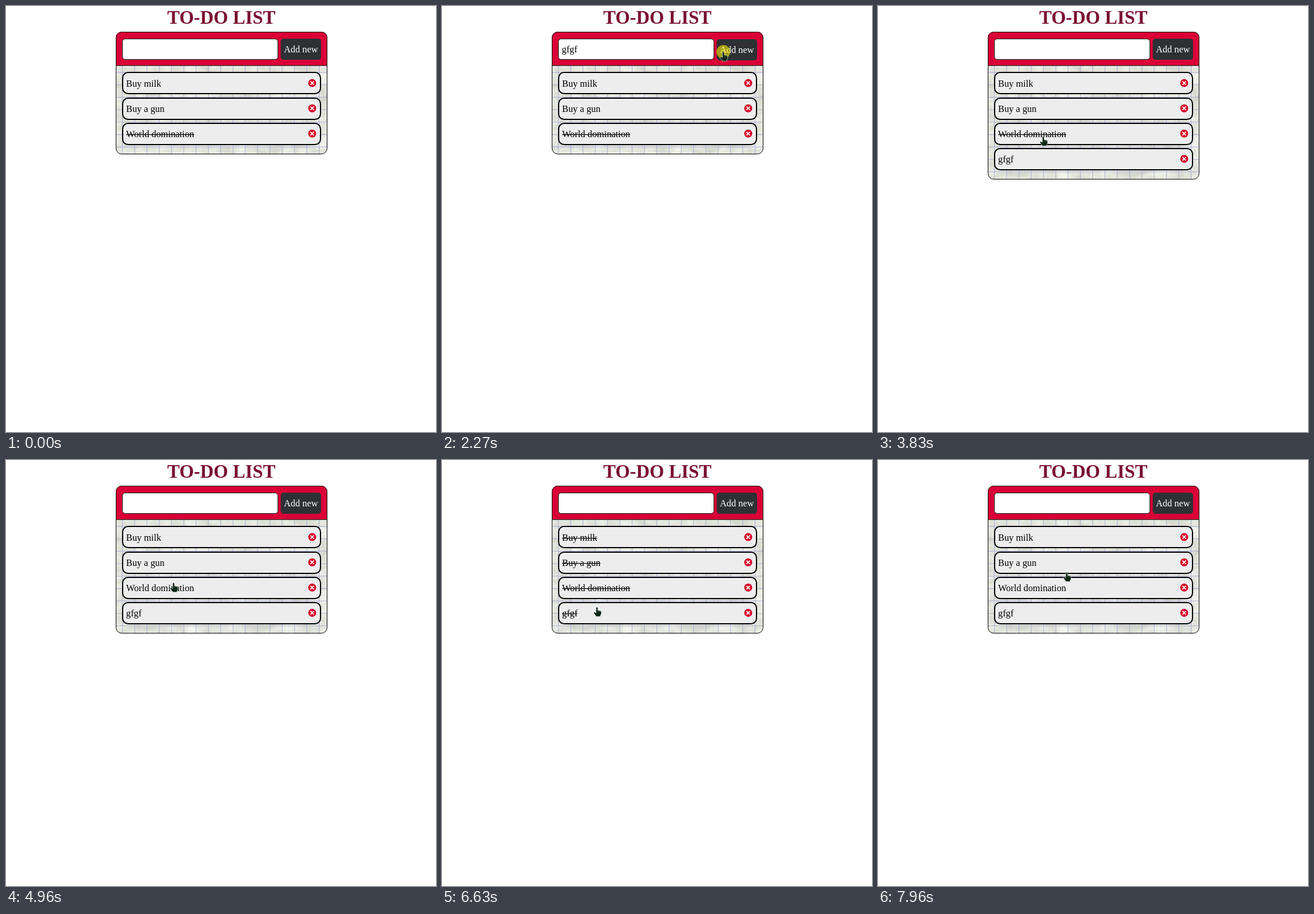
An HTML page for the animation above (7.99 s loop, 752 px wide and 744 px high).

```html
<!DOCTYPE html>
<html lang="en">
<head>
<meta charset="utf-8">
<title>To-do list</title>
<style>
html, body { margin: 0; width: 100%; height: 100%; overflow: hidden; background: #fff; }
svg { display: block; }
text { font: 16.35px "Liberation Serif", "Times New Roman", serif; white-space: pre; }
.title { font-size: 32.7px; font-weight: bold; }
</style>
</head>
<body>
<svg id="stage" width="752" height="744" viewBox="0 0 752 744">
  <defs>
    <clipPath id="cardClip"><rect id="clipBox" x="192" y="45" width="370" height="214" rx="10"/></clipPath>
    <filter id="paper" x="0" y="0" width="100%" height="100%" color-interpolation-filters="sRGB">
      <feTurbulence type="fractalNoise" baseFrequency="0.035 0.06" numOctaves="3" seed="4"/>
      <feColorMatrix values="0.2 0 0 0 0.79  0.2 0 0 0 0.795  0.22 0 0 0 0.755  0 0 0 0 1"/>
    </filter>
  </defs>
  <text class="title" x="376.6" y="31" text-anchor="middle" fill="#7a0f2f">TO-DO LIST</text>
  <g clip-path="url(#cardClip)">
    <rect x="192" y="104" width="370" height="200" filter="url(#paper)"/>
    <g id="grid" stroke="#a9add0" stroke-opacity=".75" stroke-width="1.3"/>
    <rect x="192" y="45" width="370" height="59" fill="#da0037"/>
    <rect x="192" y="103.5" width="370" height="1"/>
  </g>
  <rect id="card" x="192.5" y="45.5" width="369" height="213" rx="10" fill="none" stroke="#000"/>
  <rect x="203.5" y="57.5" width="272" height="36" rx="5" fill="#fff" stroke="#000"/>
  <text id="field" x="209.5" y="81"></text>
  <rect id="caret" y="68" width="1" height="17"/>
  <g id="button">
    <rect x="480.5" y="57" width="70.5" height="37" rx="5" fill="#2d3134"/>
    <text x="486" y="81" fill="#fff">Add new</text>
  </g>
  <g id="list"></g>
  <circle id="spot" r="12" fill="#ffee00" fill-opacity=".58"/>
  <g id="cursor">
    <path id="arrow" d="M0 0V15.5L3.6 12.2L6 17.6L8.4 16.5L6 11.2H11Z" fill="#fff" stroke="#111"/>
    <g id="beam" fill="none">
      <path d="M-4 -6.5H4M0 -6.5V6.5M-4 6.5H4" stroke="#d5e3d3" stroke-width="2.6"/>
      <path d="M-4 -6.5H4M0 -6.5V6.5M-4 6.5H4" stroke="#34503a"/>
    </g>
    <g id="hand">
      <path d="M-1.6 1.4Q-1.5 0 0 0Q1.5 0 1.5 1.4V5.4L6 6.4Q7.6 7 7.6 8.6V11Q7.4 13 6 14.5V16.3H-2V15L-5.6 10.6Q-6 8.8 -4.2 8.6L-1.6 10.2Z" fill="#0d2513" stroke="#e6e9e4" stroke-width=".6"/>
      <path d="M1.6 6V9M3.8 6.6V9.2M5.8 7.2V9.4" stroke="#71806f" stroke-width=".5"/>
    </g>
  </g>
</svg>
<script>
const LOOP = 7990, HOLD = 70, TOP = 115, PITCH = 44.1, ENTER = 200;
const TYPE_FROM = 1230, TYPE_STEP = 95, WORD = "gfgf";
const $ = id => document.getElementById(id);
const show = (el, on) => el.setAttribute("visibility", on ? "visible" : "hidden");

function add(parent, tag, attrs, text) {
  const el = document.createElementNS("http://www.w3.org/2000/svg", tag);
  for (const k in attrs) el.setAttribute(k, attrs[k]);
  if (text) el.textContent = text;
  parent.appendChild(el);
  return el;
}

// Pointer script: each stop is reached no later than its time.
const stops = [];
const move = (at, x, y) => stops.push({ at, x, y, until: at });
function click(at, row, x, y) {
  const last = stops[stops.length - 1];
  stops.push({ at, row, x: x ?? last.x, y: y ?? last.y, until: at + HOLD, press: true });
}

move(ENTER, 704, 742);
move(750, 352, 240);
move(950, 361, 80);
click(1050, "field");
move(1690, 361, 80);
click(2260, "button", 492, 80);
click(3040, 3, 258, 276);
click(3460, 3);
click(4010, 2, 289, 228);
click(4610, 2, 293, 220);
click(4860, 2);
click(5190, 1, 294, 175);
click(5540, 0, 295, 141);
click(6030, 2, 289, 209);
click(6460, 3, 271, 257);
click(6790, 3);
click(7130, 2, 279, 228);
click(7440, 1, 288, 180);
click(7750, 0, 294, 137);
move(7960, 330, 196);

const presses = stops.filter(s => s.press);
const added = presses.find(s => s.row === "button").until;

for (let x = 203.5; x < 562; x += 21.5) add($("grid"), "path", { d: `M${x} 104V304` });
for (let y = 116; y < 304; y += 21.7) add($("grid"), "path", { d: `M192 ${y}H562` });

const rows = ["Buy milk", "Buy a gun", "World domination", WORD].map((label, i) => {
  const shift = i * PITCH, y = Math.ceil(TOP + shift), cy = 134.6 + shift;
  const g = add($("list"), "g", {});
  add(g, "rect", { x: 204, y: y + 1, width: 346, height: 37, rx: 9.5, fill: "#ededed", stroke: "#000", "stroke-width": 2 });
  const text = add(g, "text", { x: 210, y: Math.round(141 + shift) }, label);
  const line = add(g, "rect", { x: 210, y: Math.round(135.6 + shift), width: text.getComputedTextLength(), height: 1.2 });
  add(g, "circle", { cx: 535.5, cy, r: 7, fill: "#d60029" });
  add(g, "path", { d: `M533 ${cy - 2.5}l5 5m0 -5l-5 5`, stroke: "#fff", "stroke-width": 1.8, "stroke-linecap": "round" });
  return { g, line, struck: i === 2 };
});

function pointer(t) {
  const n = stops.findIndex(s => s.at > t);
  const a = stops[n < 0 ? stops.length - 1 : Math.max(0, n - 1)], b = n < 0 ? a : stops[n];
  const dx = b.x - a.x, dy = b.y - a.y;
  const span = Math.min(b.at - a.until, 200 + 1.1 * Math.hypot(dx, dy));
  const k = span > 0 ? Math.min(1, Math.max(0, (t - a.until) / span)) : 0;
  return [a.x + dx * k, a.y + dy * k];
}

function shape(x, y, count) {
  if (y > 57 && y < 94) {
    if (x > 203 && x < 476) return "beam";
    if (x > 480 && x < 551) return "hand";
  }
  const depth = y - TOP;
  const inRow = depth >= 0 && depth < count * PITCH && depth % PITCH < 39;
  return inRow && x > 203 && x < 551 ? "hand" : "arrow";
}

function draw(t) {
  const full = t >= added, count = full ? 4 : 3;
  $("clipBox").setAttribute("height", full ? 258 : 214);
  $("card").setAttribute("height", full ? 257 : 213);
  show(rows[3].g, full);
  rows.forEach((row, i) => {
    const flips = presses.filter(s => s.row === i && s.until <= t).length;
    show(row.line, (i < count) && row.struck !== (flips % 2 === 1));
  });

  const typed = Math.max(0, Math.floor((t - TYPE_FROM) / TYPE_STEP) + 1);
  $("field").textContent = full ? "" : WORD.slice(0, typed);
  $("caret").setAttribute("x", 209.5 + $("field").getComputedTextLength());
  show($("caret"), t >= 1120 && t < 1650);

  const [x, y] = pointer(t);
  const held = presses.find(s => t >= s.at && t < s.until);
  const kind = shape(x, y, count);
  $("cursor").setAttribute("transform", `translate(${x.toFixed(1)} ${y.toFixed(1)})`);
  for (const id of ["arrow", "beam", "hand"]) show($(id), t >= ENTER && id === kind);
  $("spot").setAttribute("cx", x);
  $("spot").setAttribute("cy", y);
  show($("spot"), held);
  $("button").setAttribute("transform", `translate(0 ${held && held.row === "button" ? 1 : 0})`);
}

const start = performance.now();
function tick() {
  draw((performance.now() - start) % LOOP);
  requestAnimationFrame(tick);
}
tick();
</script>
</body>
</html>
```
